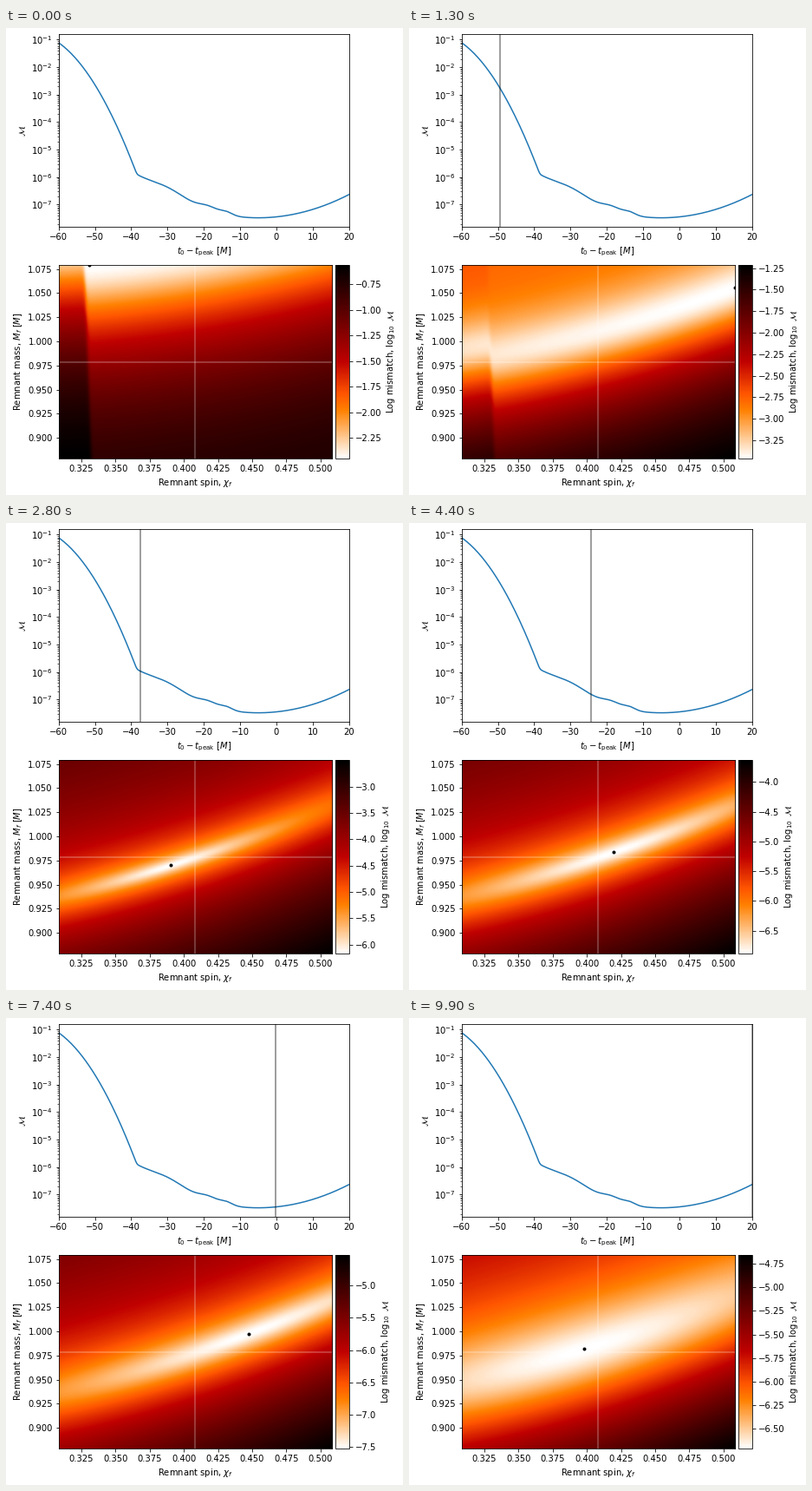
These frames come from a looping animation (458 px wide and 538 px high, 10 s). A matplotlib script:

```python
import numpy as np
import matplotlib.pyplot as plt
from matplotlib.animation import FuncAnimation

W, H, DPI = 458, 538, 72
FRAMES, INTERVAL = 100, 100
SPIN, MASS, HALF = 0.4084, 0.9787, 0.1
N = 240

# Key points (step, spin offset) of the best fit
BEST = [(0, -0.079), (13, 0.1), (28, -0.018), (44, 0.011), (62, 0.011),
        (74, 0.039), (99, -0.011)]


def start_time(i):
    return -60 + 80 * i / (FRAMES - 1)


def bump(t, height, centre, width):
    return height * np.exp(-((t - centre) / width)**2 / 2)


def curve(t):
    """Log mismatch: a steep fall that meets a shallow, rippled bowl."""
    u = t + 60
    fall = -1.11 - 0.093 * u - 0.006 * u**2
    bowl = (-7.48 + 0.00135 * (t + 5)**2 + bump(t, 0.27, -29.8, 5.2)
            + bump(t, 0.16, -18.7, 2.5) + bump(t, 0.11, -13.8, 1.7))
    return np.logaddexp(20 * fall, 20 * bowl) / 20


def decay(i, scale, power):
    return np.exp(-(i / scale)**power)


spins = np.linspace(SPIN - HALF, SPIN + HALF, N)
masses = np.linspace(MASS - HALF, MASS + HALF, N)
X, Y = np.meshgrid(spins, masses)
S = X - SPIN
SEAM = 1 / (1 + np.exp((X - 0.3293 - 0.025 * (MASS - Y)) / 0.0007))


def surface(i):
    """Log mismatch over spin and mass: a valley along a tilted ridge."""
    fade = max(0, 1 - i / 28)
    knee = 4 * fade * (1 - fade)
    late = max(0, (i - 74) / 25)
    vmax = -4.68 + 4.117 * decay(i, 36.5, 1.7)
    vmin = curve(start_time(i)) - 0.07 - 1.27 * decay(i, 16.5, 1.6)

    ridge = (0.978 + 0.115 * fade**2 + 0.008 * late
             + (0.47 - 0.245 * fade**1.5 - 0.03 * late) * S + 0.7 * S**2)
    d = Y - ridge - 0.022 * fade * SEAM
    steep = (vmax + 1 - (3.2 + 2.5 * knee) * d
             + (8 - 20 * fade - 15 * knee - 6 * late) * d**2
             + 0.2 * fade * SEAM)
    along = S - np.interp(i, *np.transpose(BEST))
    spread = vmax - 0.8 - fade + 0.45 * late

    z = np.log10(10**vmin + 10**spread * along**2 + 10**steep * d**2)
    z = (z - z.min()) / np.ptp(z)
    return vmin + (vmax - vmin) * z, vmin, vmax


def add_axes(x, y, w, h):
    return fig.add_axes([x / W, 1 - (y + h) / H, w / W, h / H])


fig = plt.figure(figsize=((W + 0.001) / DPI, (H + 0.001) / DPI), dpi=DPI,
                 facecolor='white')

top = add_axes(60.75, 7, 334.8, 222.1)
ts = np.linspace(-60, 20, 321)
top.semilogy(ts, 10**curve(ts))
now = top.axvline(-60, color='k', alpha=0.5)
top.set_xlim(-60, 20)
top.set_ylim(10**-7.81, 10**-0.795)
top.set_xlabel(r'$t_0 - t_\mathrm{peak}\ [M]$')
top.set_ylabel(r'$\mathcal{M}$')

heat = add_axes(60.75, 273.4, 315.4, 222.4)
z, lo, hi = surface(0)
img = heat.imshow(z, cmap='gist_heat_r', origin='lower', aspect='auto',
                  interpolation='bilinear', vmin=lo, vmax=hi,
                  extent=[spins[0], spins[-1], masses[0], masses[-1]])
heat.axvline(SPIN, color='white', alpha=0.3)
heat.axhline(MASS, color='white', alpha=0.3)
best, = heat.plot([], [], 'k.')
heat.set_xlim(spins[0], spins[-1])
heat.set_ylim(masses[0], masses[-1])
heat.set_xlabel(r'Remnant spin, $\chi_f$')
heat.set_ylabel(r'Remnant mass, $M_f\ [M]$')

bar = fig.colorbar(img, cax=add_axes(379.75, 273.4, 15.8, 222.4))
bar.set_label(r'Log mismatch, $\log_{10}\ \mathcal{M}$')


def update(i):
    t = start_time(i)
    now.set_xdata([t, t])
    z, lo, hi = surface(i)
    img.set_data(z)
    img.set_clim(lo, hi)
    row, col = np.unravel_index(z.argmin(), z.shape)
    best.set_data([spins[col]], [masses[row]])
    return now, img, best


anim = FuncAnimation(fig, update, frames=FRAMES, interval=INTERVAL,
                     repeat=True, repeat_delay=0, blit=False)
plt.show()
```
